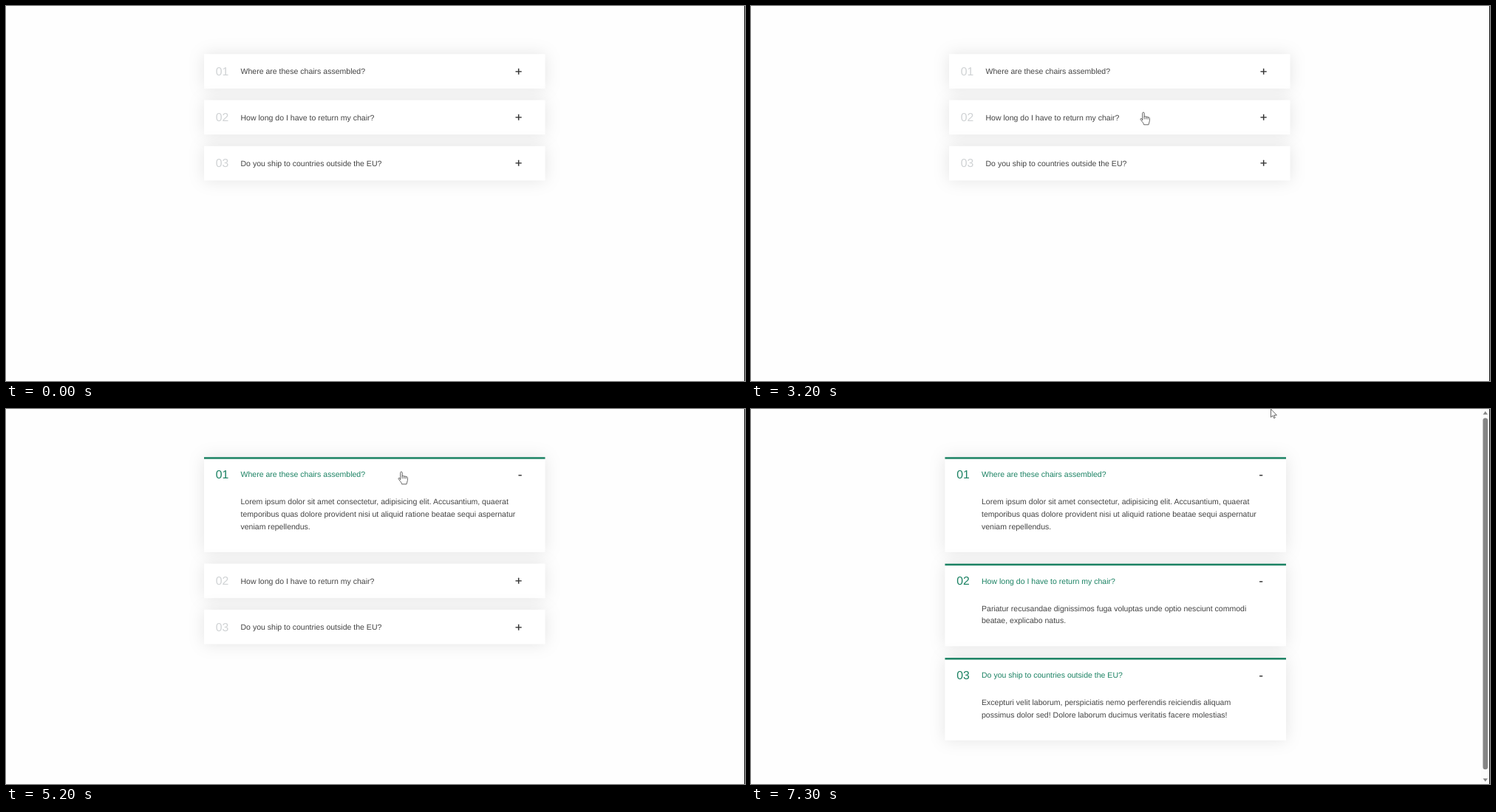
An HTML page for the animation above (7.6 s loop, 1000 by 508 pixels).

```html
<!DOCTYPE html>
<html lang="en">
<head>
<meta charset="utf-8">
<title>Accordion</title>
<style>
  html, body { margin: 0; width: 100%; height: 100%; overflow: hidden; background: #fefefe; }
  svg { display: block; width: 1000px; height: 508px; }
  text { font: 10.54px "Liberation Sans", Arial, sans-serif; fill: #444; text-rendering: geometricPrecision; }
  .card { fill: #fff; filter: drop-shadow(0 0 10.5px rgba(0, 0, 0, .1)); }
  .number, .icon { font-size: 15.8px; }
  .number { fill: #d0d3d5; }
  .icon { fill: #333; stroke: #333; stroke-width: .3; text-anchor: end; }
  .bar, .open .number, .open .title { fill: #1b8263; }
  .bar, .body { display: none; }
  .open .bar, .open .body { display: inline; }
  #cursor path { fill: #fff; stroke: #555; stroke-width: .9; stroke-linejoin: round; stroke-linecap: round; }
</style>
</head>
<body>
<svg viewBox="0 0 1000 508">
  <g id="list"></g>
  <g id="scrollbar" fill="#858585">
    <rect x="988" width="11" height="508" fill="#fbfbfb"/>
    <rect x="990.4" y="12.3" width="6.6" height="476" rx="3.3"/>
    <path d="M990.5 7.5h6.4l-3.2-4.4zM990.5 500.4h6.4l-3.2 4.4z"/>
  </g>
  <rect x="999" width="1" height="508" fill="#111"/>
  <g id="cursor">
    <path id="hand" d="M-1.3 10.5V1.2C-1.3-.4 1.2-.4 1.2 1.2V6.2C1.5 5 3.6 5.2 3.7 6.5C4.1 5.5 6 5.8 6.1 7.1C6.6 6.3 8.4 6.7 8.4 8.2V11.5C8.4 13.5 7.1 14.6 7 16.8H.6C.4 14.6-1.6 13-3.6 10.2C-4.7 8.6-3.1 7.7-2.1 8.9ZM1.2 6.2V9M3.7 6.5V9M6.1 7.1V9.2"/>
    <path id="arrow" d="M.5 .5V11.2L3 8.9L4.7 12.5L6.3 11.8L4.7 8.3H8Z"/>
  </g>
</svg>
<script>
const LOOP = 7600, STEP = 100;
const LEFT = 268, TOP = 65.2, WIDTH = 461.5, CLOSED = 46.6, GAP = 15.7, LINE = 16.85;

// toggles: times at which the card is clicked
const items = [
  { title: "Where are these chairs assembled?", toggles: [1200, 1400, 1900, 2500, 5200],
    body: ["Lorem ipsum dolor sit amet consectetur, adipisicing elit. Accusantium, quaerat",
           "temporibus quas dolore provident nisi ut aliquid ratione beatae sequi aspernatur",
           "veniam repellendus."] },
  { title: "How long do I have to return my chair?", toggles: [3400, 3900, 6000],
    body: ["Pariatur recusandae dignissimos fuga voluptas unde optio nesciunt commodi",
           "beatae, explicabo natus."] },
  { title: "Do you ship to countries outside the EU?", toggles: [4500, 4800, 6400],
    body: ["Excepturi velit laborum, perspiciatis nemo perferendis reiciendis aliquam",
           "possimus dolor sed! Dolore laborum ducimus veritatis facere molestias!"] },
];

// time, x, y of the pointer's hot spot
const path = [
  [200, 646, 40], [300, 560, 95], [400, 450, 165], [500, 370, 199], [600, 455, 130], [700, 528.5, 86],
  [2800, 528.5, 86], [3100, 531, 144], [4000, 531, 144], [4300, 527, 213],
  [4800, 527, 213], [5100, 535, 85], [5500, 535, 85], [5800, 538.5, 221],
  [6000, 538.5, 221], [6300, 566.5, 352.5], [6700, 566.5, 352.5],
  [7100, 700, 110], [7300, 703, 0], [LOOP, 703, 0],
];

const $ = id => document.getElementById(id);
const show = (node, visible) => node.style.display = visible ? "" : "none";

function add(parent, tag, className, attributes, content = "") {
  const node = document.createElementNS("http://www.w3.org/2000/svg", tag);
  node.setAttribute("class", className);
  for (const [key, value] of Object.entries(attributes)) node.setAttribute(key, value);
  node.textContent = content;
  return parent.appendChild(node);
}

items.forEach((item, i) => {
  item.group = add($("list"), "g", "", {});
  item.card = add(item.group, "rect", "card", { width: WIDTH });
  add(item.group, "rect", "bar", { width: WIDTH, height: 2.5 });
  add(item.group, "text", "number", { x: 15.7, y: 28.7 }, "0" + (i + 1));
  add(item.group, "text", "title", { x: 49.5, y: 27 }, item.title);
  item.icon = add(item.group, "text", "icon", { x: 430.2, y: 28.7 });
  item.body.forEach((line, n) =>
    add(item.group, "text", "body", { x: 49.5, y: 64 + n * LINE }, line));
});

function pointerAt(t) {
  const next = path.findIndex(point => point[0] > t);
  if (next < 1) return null;
  const [t0, x0, y0] = path[next - 1], [t1, x1, y1] = path[next];
  const k = (t - t0) / (t1 - t0);
  return [x0 + (x1 - x0) * k, y0 + (y1 - y0) * k];
}

function render(t) {
  const open = items.map(item => item.toggles.filter(time => time <= t).length % 2 === 1);
  const scrolls = open.every(Boolean);
  const left = LEFT - (scrolls ? 5.5 : 0);
  const pointer = pointerAt(t);
  let y = TOP, hovering = false;

  items.forEach((item, i) => {
    const height = CLOSED + (open[i] ? 31.5 + item.body.length * LINE : 0);
    item.group.setAttribute("class", open[i] ? "open" : "");
    item.group.setAttribute("transform", `translate(${left} ${y})`);
    item.card.setAttribute("height", height);
    item.icon.textContent = open[i] ? "-" : "+";
    if (pointer) {
      const [px, py] = pointer;
      hovering ||= px > left && px < left + WIDTH && py > y && py < y + height;
    }
    y += height + GAP;
  });

  show($("scrollbar"), scrolls);
  show($("cursor"), pointer);
  show($("hand"), hovering);
  show($("arrow"), !hovering);
  if (pointer) $("cursor").setAttribute("transform", `translate(${pointer})`);
}

const start = performance.now();
function frame() {
  const t = (performance.now() - start) % LOOP;
  render(Math.floor(t / STEP) * STEP);
  requestAnimationFrame(frame);
}
frame();
</script>
</body>
</html>
```
